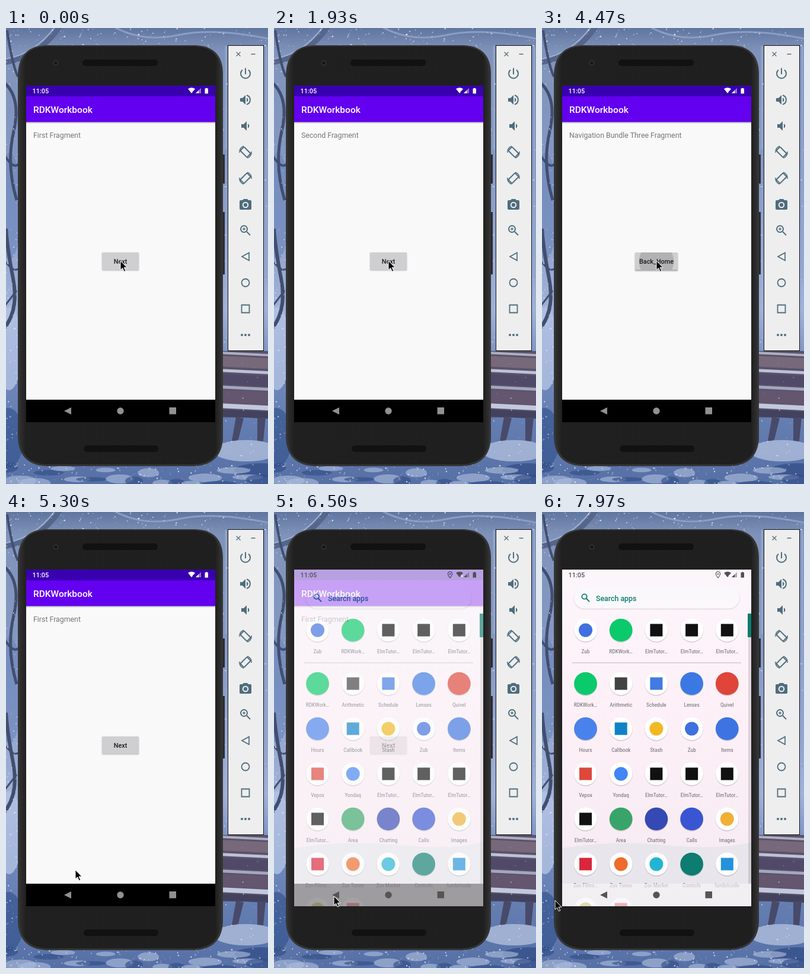
Write an HTML page that moves like this. It is 442 by 768 pixels and loops after 8 s.

```html
<!DOCTYPE html>
<html lang="en">
<head>
<meta charset="utf-8">
<title>Emulator screen</title>
<style>
html, body { margin: 0; width: 100%; height: 100%; overflow: hidden; background: #7186b4; }
svg { display: block; width: 100vw; height: 100vh; }
text { font-family: Roboto, sans-serif; }
.m { font-weight: 500; }
.label { font: 9.3px "Roboto Condensed", Roboto, sans-serif; font-stretch: condensed; fill: #6c6a72; text-anchor: middle; }
.tool { fill: #4f6d7d; }
.line { fill: none; stroke: #4f6d7d; stroke-width: 2; }
</style>
</head>
<body>
<svg id="stage" viewBox="0 0 442 768">
  <defs>
    <linearGradient id="sky" x1="0" y1="0" x2="0" y2="1">
      <stop offset="0" stop-color="#60759f"/><stop offset=".05" stop-color="#7f93ba"/>
      <stop offset=".3" stop-color="#8498c3"/><stop offset=".62" stop-color="#a0b1d8"/>
      <stop offset=".75" stop-color="#7189bb"/><stop offset="1" stop-color="#5670a6"/>
    </linearGradient>
    <linearGradient id="case" x1="0" x2="1">
      <stop offset="0" stop-color="#303030"/><stop offset=".03" stop-color="#202020"/>
      <stop offset=".97" stop-color="#1f1f1f"/><stop offset="1" stop-color="#303030"/>
    </linearGradient>
    <linearGradient id="wall" x1="0" y1="0" x2="0" y2="1">
      <stop offset="0" stop-color="#fcf6fb"/><stop offset=".4" stop-color="#fdf0f7"/>
      <stop offset="1" stop-color="#f6eaf2"/>
    </linearGradient>
    <linearGradient id="drop" x1="0" y1="0" x2="0" y2="1">
      <stop offset="0" stop-color="#000" stop-opacity=".25"/><stop offset="1" stop-color="#000" stop-opacity="0"/>
    </linearGradient>
    <pattern id="mesh" width="4" height="4" patternUnits="userSpaceOnUse">
      <rect width="4" height="4" fill="#0c0c0c"/><circle cx="1" cy="1" r=".8" fill="#242424"/><circle cx="3" cy="3" r=".8" fill="#242424"/>
    </pattern>
    <filter id="soft" x="-20%" y="-50%" width="140%" height="200%"><feGaussianBlur stdDeviation="1.3"/></filter>
    <clipPath id="screen"><rect x="34" y="97" width="319" height="567"/></clipPath>
    <clipPath id="btnClip"><rect id="btnMask" y="378" height="29" rx="1.5"/></clipPath>
  </defs>

  <rect width="442" height="768" fill="url(#sky)"/>
  <g id="scene"></g>

  <g id="shell">
    <path d="M364 213h5v49h-5zM364 310h5v105h-5z" fill="#2b2b30"/>
    <path d="M66 29H320Q366 31 366 78V690Q364 736 318 738H68Q22 736 20 690V78Q22 31 66 29Z" fill="#353535"/>
    <path d="M66 31H320Q362 33 363 78V690Q361 733 318 735H68Q25 733 23 690V78Q25 33 66 31Z" fill="url(#case)"/>
    <rect x="129" y="53" width="127" height="11" rx="5" fill="url(#mesh)"/>
    <rect x="131" y="703" width="126" height="11" rx="5" fill="url(#mesh)"/>
    <circle cx="84" cy="59" r="4.5" fill="#333"/><circle cx="84" cy="59" r="2.8" fill="#151515"/>
  </g>

  <g id="app">
    <rect x="34" y="97" width="319" height="567" fill="#f9f9f9"/>
    <rect x="34" y="97" width="319" height="18" fill="#3900b0"/>
    <rect x="34" y="115" width="319" height="43.5" fill="#6300ef"/>
    <rect x="34" y="158.5" width="319" height="3" fill="url(#drop)"/>
    <text class="m" x="46" y="143" font-size="15.5" fill="#fff">RDKWorkbook</text>
    <text id="heading" x="46" y="184.5" font-size="12.35" fill="#777"></text>
    <rect id="shade" y="379" height="29.5" fill="#000" filter="url(#soft)"/>
    <rect id="btn" y="378" height="29" rx="1.5" fill="#cfcfd1"/>
    <circle id="ripple" cx="193" cy="393" clip-path="url(#btnClip)" opacity=".14"/>
    <text id="btnText" class="m" x="193" y="396.5" font-size="10.86" fill="#1c1c1c" text-anchor="middle"></text>
    <rect x="34" y="626" width="319" height="38" fill="#000"/>
    <rect id="pill" y="627" height="37" rx="18.5" fill="#fff"/>
  </g>

  <g id="drawer" clip-path="url(#screen)"></g>
  <g id="status" class="m">
    <text x="44.5" y="110" font-size="10.86">11:05</text>
    <path d="M307 102.5Q313 98.5 319 102.5L313 110Z"/>
    <path d="M315 106l4 4m0-4l-4 4" stroke="currentColor"/>
    <path d="M329 101v9h-9Z" opacity=".45"/><path d="M325 105v5h-5Z"/>
    <path d="M337 101h2.5v1h1.5v8.5h-5.5V102h1.5Z"/>
  </g>
  <g id="nav"><path d="M98 645l12-6v12Z"/><circle cx="193" cy="645" r="5.7"/><rect x="275.5" y="639" width="11.5" height="11.5"/></g>

  <g id="panel"></g>
  <path id="cursor" d="M0 0V15.5L3.6 12.2L6.3 18.2L8.8 17.1L6.1 11.3H11Z" fill="#000" stroke="#fff" stroke-linejoin="round"/>
</svg>

<script>
const $ = id => document.getElementById(id);
const set = (id, attrs) => { for (const k in attrs) $(id).setAttribute(k, attrs[k]); };
const clamp = u => Math.max(0, Math.min(1, u));
const span = (t, a, b) => clamp((t - a) / (b - a));
const easeOut = u => 1 - (1 - u) ** 3;
const easeInOut = u => u * u * (3 - 2 * u);

let seed = 41;
const rnd = (a = 0, b = 1) => {
  seed = (seed * 16807) % 2147483647;
  return a + (b - a) * seed / 2147483647;
};

function drawScene() {
  const branch = (d, w, c = '#424e70') => `<path d="${d}" fill="none" stroke="${c}" stroke-width="${w}"/>`;
  const blob = (x, y, rx, ry, c, o) => `<ellipse cx="${x}" cy="${y}" rx="${rx}" ry="${ry}" fill="${c}" opacity="${o}"/>`;
  let s = blob(6, 300, 20, 90, '#6f89bd', .7) + blob(5, 540, 22, 70, '#b5c4e5', .8) + blob(4, 690, 26, 50, '#375690', .7);
  s += branch('M-4 58Q55 50 92 -4', 9, '#56658a') + branch('M-4 53Q50 44 84 -4', 2, '#9dafd0');
  s += branch('M-3 92Q26 118 13 174T18 290', 5) + branch('M-3 214Q14 240 22 228M2 4Q10 60 20 82', 4);
  s += branch('M-3 506Q22 474 12 422T0 338', 6) + branch('M0 395Q16 415 24 402M-2 468L18 442', 3);
  s += branch('M180 -3Q230 25 290 12T442 18', 3, '#8b9ec2') + branch('M371 30V205M439 30V430', 3, '#91a5cb');
  // bench slats
  s += '<path d="M364 544H442V656H364Z" fill="#57536f"/>';
  [[545, 4, '#b1aebf'], [552, 18, '#77697a'], [574, 5, '#c0c1d2'], [582, 18, '#504968'], [602, 5, '#a5a6be'],
   [609, 22, '#63566e'], [632, 8, '#c3c8dc'], [642, 12, '#42425f']].forEach(([y, h, c]) => {
    s += `<path d="M360 ${y}L442 ${y + 4}v${h}L360 ${y + h}Z" fill="${c}"/>`;
  });
  s += '<path d="M388 655l13 2-9 36-12 8ZM424 656h14l-4 40h-10Z" fill="#484a69"/>';
  s += blob(405, 712, 55, 18, '#b0bedd', .8) + blob(430, 745, 45, 12, '#35518a', .8);
  for (let x = 0; x < 450; x += 24)
    s += blob(x, rnd(740, 768), rnd(14, 30), rnd(3, 9), x % 72 ? '#a9badb' : '#344f87', .65);
  for (let i = 0; i < 420; i++) {
    const edge = i % 4;
    const x = edge === 0 ? rnd(0, 24) : edge === 1 ? rnd(362, 442) : rnd(0, 442);
    const y = edge === 2 ? rnd(0, 32) : edge === 3 ? rnd(735, 768) : rnd(0, 768);
    s += `<circle cx="${x.toFixed(1)}" cy="${y.toFixed(1)}" r="${rnd(.4, 1.3).toFixed(1)}" fill="#e7edf8" opacity="${rnd(.35, .9).toFixed(2)}"/>`;
  }
  $('scene').innerHTML = s;
}

function drawPanel() {
  const line = (d, w = 2) => `<path class="line" style="stroke-width:${w}" d="${d}"/>`;
  const horn = x => `<path class="tool" d="M${x} -3v6h4l5 5V-8l-5 5Z"/>`;
  const turn = '<rect class="line" x="-4.5" y="-8" width="9" height="16" rx="1" transform="rotate(-45)"/>' +
    line('M-10 1A10 10 0 0 1 -3 -10M10 -1A10 10 0 0 1 3 10', 1.5);
  const icons = [
    line('M0 -9.5V1M-5 -6.5A8 8 0 1 0 5 -6.5'),
    horn(-9) + '<path class="tool" d="M2 -4Q7 0 2 4Z"/>' + line('M2 -7.7A8 8 0 0 1 2 7.7'),
    horn(-7) + '<path class="tool" d="M4 -4Q9 0 4 4Z"/>',
    turn,
    `<g transform="scale(-1 1)">${turn}</g>`,
    '<path class="tool" d="M-3 -9H3L5 -7H8Q10 -7 10 -5V7Q10 9 8 9H-8Q-10 9 -10 7V-5Q-10 -7 -8 -7H-5Z"/><circle cy="1" r="4.2" fill="#4f6d7d" stroke="#eee" stroke-width="2"/>',
    '<circle class="line" cx="-2.5" cy="-2.5" r="5.5"/>' + line('M2 2L8 8') + line('M-5 -2.5h5M-2.5 -5v5', 1.3),
    line('M-6 0L6 -6.5V6.5Z', 1.7),
    line('M-6.5 0A6.5 6.5 0 0 1 6.5 0A6.5 6.5 0 0 1 -6.5 0Z', 1.8),
    line('M-6.5 -6.5h13v13h-13Z', 1.8),
    '<g class="tool"><circle cx="-6" r="2"/><circle r="2"/><circle cx="6" r="2"/></g>'
  ];
  $('panel').innerHTML = '<rect x="374.5" y="29.5" width="60" height="514" fill="#eee" stroke="#111"/>' +
    line('M388.5 40.5l7 7m0 -7l-7 7M413.5 44h7', 1.3) +
    icons.map((d, i) => `<g transform="translate(404 ${77 + i * 44})">${d}</g>`).join('');
}

// label, colour, tile style: disc, or square/round mark on a white plate
const rows = [
  [199, 'Zub,#3f70df,r|RDKWork…,#0bca6b,d|ElmTutor…,#111,s|ElmTutor…,#111,s|ElmTutor…,#111,s'],
  [289, 'RDKWork…,#0bca6b,d|Arithmetic,#424242,s|Schedule,#427ae2,s|Lenses,#3c78e4,d|Quivel,#df4538,d'],
  [365, 'Hours,#4a82ec,d|Callbook,#0f82c8,s|Stash,#f2b822,r|Zub,#3f70df,r|Items,#3d74e2,d'],
  [441, 'Vepox,#df473c,s|Yondaq,#4285f4,r|ElmTutor…,#111,s|ElmTutor…,#111,s|ElmTutor…,#111,s'],
  [517, 'ElmTutor…,#111,s|Area,#39a469,d|Chatting,#3549b5,d|Calls,#3955d2,d|Images,#efb035,r'],
  [593, 'Zuv Films…,#d9263c,s|Zuv Tunes,#ef6a2b,r|Zuv Market,#23b4d4,r|Controls,#0c7d70,d|lumbricode,#2492da,s'],
  [669, ',#b7a82f,r|,#e03545,s']
];

function drawDrawer() {
  const tile = (x, y, [label, color, kind]) => {
    const plate = `<circle cx="${x}" cy="${y + 1}" r="19.7" opacity=".16"/><circle cx="${x}" cy="${y}" r="19.3" fill="${kind === 'd' ? color : '#fff'}"/>`;
    const mark = kind === 's' ? `<rect x="${x - 10.5}" y="${y - 10.5}" width="21" height="21" fill="${color}"/>`
      : kind === 'r' ? `<circle cx="${x}" cy="${y}" r="11.5" fill="${color}"/>` : '';
    return plate + mark + `<text class="label" x="${x}" y="${y + 38.5}">${label}</text>`;
  };
  $('drawer').innerHTML = `
    <rect x="34" y="97" width="319" height="567" fill="url(#wall)"/>
    <path d="M34 566Q120 552 210 561T353 556V664H34Z" fill="#e8e6ec"/>
    <rect x="54" y="128.5" width="279" height="35" rx="17.5" opacity=".15" filter="url(#soft)"/>
    <rect x="54" y="127" width="279" height="35.5" rx="17.7" fill="#faf8fa"/>
    <g fill="none" stroke="#0b7d70" stroke-width="1.8"><circle cx="71.5" cy="142.5" r="4.2"/><path d="M74.5 145.5l5.5 5.5"/></g>
    <text class="m" x="91" y="149.5" font-size="12.35" fill="#0b7d70">Search apps</text>
    <rect x="51" y="253" width="285" height="2" fill="#dcd6dc"/>
    <rect x="348" y="171" width="5" height="455" opacity=".12"/>
    <rect x="347" y="171" width="6" height="40" rx="1" fill="#0b7d70"/>` +
    rows.map(([y, list]) => list.split('|').map((item, i) => tile(73.5 + i * 59.7, y, item.split(','))).join('')).join('') +
    `<rect x="34" y="626" width="319" height="38" fill="#f8f4f8" opacity=".65"/>
    <path d="M297 111Q293 106 293.5 104A3.5 3.5 0 0 1 300.5 104Q301 106 297 111Z" fill="none" stroke="#555" stroke-width="1.2"/><circle cx="297" cy="104.5" r="1.2" fill="#555"/>`;
}

const LOOP = 8000;
const pages = ['First Fragment', 'Second Fragment', 'Navigation Bundle Three Fragment'];
const taps = [[1000, 1130], [2200, 2330], [2850, 2980], [3360, 3570], [3900, 4030], [4420, 4550]];
const stops = [[0, 193, 392], [4750, 193, 392], [5500, 101, 647], [7400, 101, 647], [7850, 22, 654], [LOOP, 22, 654]];

function cursorAt(t) {
  const i = Math.max(1, stops.findIndex(p => p[0] > t));
  const [a, b] = [stops[i - 1], stops[i]];
  const u = easeInOut(span(t, a[0], b[0]));
  return [a[1] + (b[1] - a[1]) * u, a[2] + (b[2] - a[2]) * u];
}

function render(t) {
  const page = taps.filter(p => p[1] <= t).length % 3;
  const tap = taps.find(p => t >= p[0] && t < p[1]);
  const press = tap ? easeOut(span(t, tap[0], tap[0] + 225)) : 0;
  const w = page === 2 ? 72 : 62;
  const x = 193 - w / 2;
  $('heading').textContent = pages[page];
  $('btnText').textContent = page === 2 ? 'Back_Home' : 'Next';
  set('btn', { x, width: w });
  set('btnMask', { x, width: w });
  set('shade', { x, width: w, y: 379 + press * 1.5, opacity: .25 + press * .15 });
  set('ripple', { r: press ? 8 + 40 * press : 0 });

  const grow = easeOut(span(t, 6060, 6180));
  set('pill', { x: 104.5 - 38.5 * grow, width: 77 * grow, opacity: .125 * (1 - span(t, 6240, 6420)) });

  const home = easeInOut(span(t, 6380, 6580));
  const light = Math.round(145 + 60 * span(t, 6020, 6120));
  const dark = home > .5;
  set('drawer', { opacity: home });
  set('nav', { fill: dark ? '#555' : `rgb(${light},${light},${light})` });
  set('status', { fill: dark ? '#505055' : '#fff', color: dark ? '#fdf3fa' : '#3900b0' });
  set('cursor', { transform: `translate(${cursorAt(t).map(v => v.toFixed(2)).join(' ')})` });
}

drawScene();
drawPanel();
drawDrawer();
const start = performance.now();
function tick() {
  render((performance.now() - start) % LOOP);
  requestAnimationFrame(tick);
}
tick();
</script>
</body>
</html>
```
